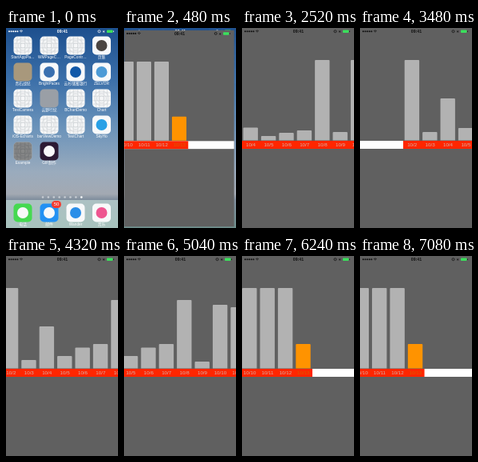
An HTML page with a canvas for the animation above (7200 ms loop, 140x250 px).

```html
<!DOCTYPE html>
<html lang="zh">
<head>
<meta charset="utf-8">
<title>Bar chart scrolling</title>
<style>
  html, body { margin: 0; width: 100%; height: 100%; overflow: hidden; background: #606060; }
  canvas { display: block; }
</style>
</head>
<body>
<canvas id="stage" width="140" height="250"></canvas>
<script>
const ctx = document.getElementById('stage').getContext('2d');
const W = 140, H = 250, LOOP = 7200, STEP = 120;
const FONT = '"Liberation Sans", "Noto Sans CJK SC", "Noto Sans CJK", sans-serif';

const clamp01 = v => Math.max(0, Math.min(1, v));
const mix = (a, b, k) => a + (b - a) * k;
const ease = (t, from, to) => { const k = clamp01((t - from) / (to - from)); return k * k * (3 - 2 * k); };

function rect(x, y, w, h, color) {
  ctx.fillStyle = color;
  ctx.fillRect(x, y, w, h);
}
function round(x, y, w, h, r, color) {
  ctx.fillStyle = color;
  ctx.beginPath();
  ctx.roundRect(x, y, w, h, r);
  ctx.fill();
}
function disc(x, y, r, color) {
  ctx.fillStyle = color;
  ctx.beginPath();
  ctx.arc(x, y, r, 0, 7);
  ctx.fill();
}
function text(str, x, y, size, color, weight = '') {
  ctx.font = `${weight} ${size}px ${FONT}`;
  ctx.textAlign = 'center';
  ctx.textBaseline = 'middle';
  ctx.fillStyle = color;
  ctx.fillText(str, x, y);
}

function statusBar(color) {
  for (let i = 0; i < 5; i++) disc(4 + i * 2.6, 4.2, 1.05, color);
  ctx.strokeStyle = color;
  ctx.lineWidth = 0.8;
  for (const r of [1.2, 2.7]) {
    ctx.beginPath();
    ctx.arc(19, 5.8, r, -2.35, -0.8);
    ctx.stroke();
  }
  text('09:41', 70.5, 4.5, 5.2, color, 'bold');
  ctx.beginPath();
  ctx.arc(116.5, 4.2, 1.5, 0, 7);
  ctx.stroke();
  text('∗', 122, 4.5, 5, color);
  round(126, 2.6, 7.5, 3.4, 0.7, '#3be05c');
  rect(134, 3.5, 0.8, 1.6, color);
}

// Home screen: [label, tile colour, dot colour]; no colours means the blank app template
const COLUMNS = [21, 54, 87, 119.5];
const WHITE = '#f8f9fa';
const APPS = [
  ['StartAppPa…'], ['WMPageC…'], ['PageContr…'], ['页集', WHITE, '#4a4542'],
  ['青石战纪', '#a8987c'], ['BrightPaces', WHITE, '#3a70b0'], ['云杉储蓄银行', WHITE, '#1259a8'], ['ZELVOR', WHITE, '#4d9bd6'],
  ['TestCamera'], ['云野行纪', '#9a9fa6'], ['BChartDemo'], ['Chart'],
  ['iOS-Echarts'], ['barViewDemo'], ['TestChart'], ['SkyHo', WHITE, '#28a0e6'],
  ['Example'], ['GIF制作', '#2c1a33', WHITE]
];
const DOCK = [['电话', '#45d950', WHITE], ['邮件', '#2391f3', WHITE], ['Wander', WHITE, '#2b8fe8'], ['音乐', WHITE, '#ee5590']];
const LAUNCH = { x: 21, y: 154 };

function tile(x, y, color) {
  round(x - 11.5, y - 11.5, 23, 23, 5, color);
}

function templateIcon(x, y) {
  tile(x, y, '#f6f7f8');
  ctx.strokeStyle = '#c3c8cc';
  ctx.lineWidth = 0.45;
  ctx.beginPath();
  for (const d of [-7, -2.7, 2.7, 7]) {
    ctx.moveTo(x + d, y - 11); ctx.lineTo(x + d, y + 11);
    ctx.moveTo(x - 11, y + d); ctx.lineTo(x + 11, y + d);
  }
  for (const r of [3.2, 5.6, 9.2]) {
    ctx.moveTo(x + r, y);
    ctx.arc(x, y, r, 0, 7);
  }
  ctx.stroke();
}

function icon([label, color, dot], x, y) {
  if (color) tile(x, y, color);
  else templateIcon(x, y);
  if (dot) disc(x, y, 7, dot);
  if (label === 'Example') tile(x, y, 'rgba(0,0,0,.45)');
  text(label, x, y + 15, 4.8, '#fff');
}

function wallpaper() {
  const g = ctx.createLinearGradient(0, 0, 0, H);
  [[0, '#1d4f8e'], [0.25, '#3a6ea8'], [0.5, '#6b93ba'], [0.72, '#9aabbd'], [0.83, '#a3a9b2'], [0.86, '#7d8c9c'], [1, '#6f8f8c']]
    .forEach(([at, color]) => g.addColorStop(at, color));
  rect(0, 0, W, H, g);
}

function homeScreen(zoom) {
  wallpaper();
  ctx.save();
  ctx.globalAlpha = 1 - zoom;
  ctx.translate(LAUNCH.x, LAUNCH.y);
  ctx.scale(1 + 3 * zoom, 1 + 3 * zoom);
  ctx.translate(-LAUNCH.x, -LAUNCH.y);
  rect(0, 215, W, 35, 'rgba(205,228,222,.6)');
  APPS.forEach((app, i) => icon(app, COLUMNS[i % 4], 22 + Math.floor(i / 4) * 33));
  for (let i = 0; i < 8; i++) disc(46 + i * 6.9, 211.5, 1.3, i === 7 ? '#fff' : 'rgba(255,255,255,.5)');
  DOCK.forEach((app, i) => icon(app, COLUMNS[i], 231));
  round(57, 216, 12, 9, 4.5, '#f33b30');
  text('50', 63, 220.8, 6, '#fff');
  ctx.restore();
  statusBar('#fff');
}

// Chart: one cell per day, starting on 10/2
const CELL = 22.4, FIRST_DAY = 2, BASE = 140.5;
const WIDE_SCALE = [30, 3, 15.5, 5, 9, 12, 100, 10, 100, 100, 100, 30];
const NEAR_SCALE = [100, 10, 52, 15, 25.5, 30, 85, 8, 79, 76, 76, 30];
const SCROLL = [
  [1950, -187.3], [2160, -160], [2520, -45], [2880, 42], [3200, 57], [3480, 54], [4260, 0],
  [5040, -70], [5640, -134], [6120, -173], [6240, -180.8], [6480, -186.8], [6960, -188.1], [7200, -188.3]
];

// Smooth curve through the scroll points
function scrollAt(t) {
  const last = SCROLL.length - 1;
  if (t <= SCROLL[0][0]) return SCROLL[0][1];
  const i = Math.max(0, SCROLL.findIndex(p => p[0] >= t) - 1);
  const slope = n => {
    if (n <= 0 || n >= last) return 0;
    const [a, b] = [SCROLL[n - 1], SCROLL[n + 1]];
    return (b[1] - a[1]) / (b[0] - a[0]);
  };
  const [t0, x0] = SCROLL[i], [t1, x1] = SCROLL[i + 1];
  const d = t1 - t0, k = (t - t0) / d, q = 1 - k;
  return x0 * (1 + 2 * k) * q * q + slope(i) * d * k * q * q
       + x1 * k * k * (3 - 2 * k) - slope(i + 1) * d * k * k * q;
}

function chart(t) {
  const left = scrollAt(t);
  const near = ease(t, 2680, 2920) - ease(t, 5420, 5760);
  rect(0, 0, W, H, '#606060');
  rect(0, 141, W, 10, '#fff');
  rect(left, 141, CELL * WIDE_SCALE.length, 10, '#ff2600');
  WIDE_SCALE.forEach((wide, i) => {
    const x = left + i * CELL;
    if (x < -CELL || x > W) return;
    const today = i === WIDE_SCALE.length - 1;
    const h = mix(wide, NEAR_SCALE[i], near) + 0.5;
    round(x + 1.7, BASE - h, 18.4, h, [1, 1, 0, 0], today ? '#ff9300' : '#b2b2b2');
    text(`10/${FIRST_DAY + i}`, x + CELL / 2, 146.4, 6.2, today ? '#d06000' : '#d0b4b0');
  });
  statusBar('#111');
}

function draw(t) {
  const open = t < STEP ? 0 : t > 840 ? 1 : 1 - Math.exp(-(t - 100) / 98);
  if (open < 1) homeScreen(open);
  if (open === 0) return;
  const scale = mix(0.16, 1, open);
  ctx.save();
  ctx.globalAlpha = clamp01(open * 1.8);
  ctx.translate(mix(LAUNCH.x, W / 2, open), mix(LAUNCH.y, H / 2, open));
  ctx.scale(scale, scale);
  ctx.translate(-W / 2, -H / 2);
  ctx.beginPath();
  ctx.rect(0, 0, W, H);
  ctx.clip();
  chart(t);
  ctx.restore();
}

function tick() {
  const t = performance.now() % LOOP;
  draw(Math.floor(t / STEP) * STEP);
  requestAnimationFrame(tick);
}
tick();
</script>
</body>
</html>
```
